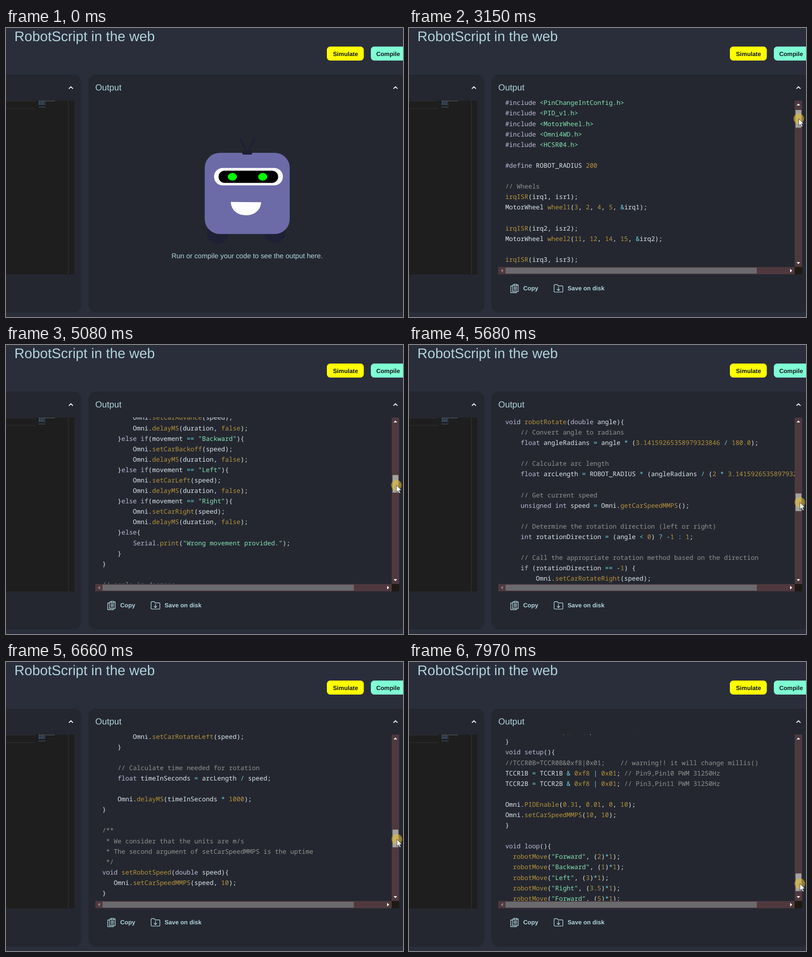
Write an HTML page that moves like this. It is 876 px wide and 639 px high and loops after 8000 ms.

```html
<!DOCTYPE html>
<html lang="en">
<head>
<meta charset="utf-8">
<title>RobotScript in the web</title>
<style>
@property --s { syntax: "<number>"; inherits: true; initial-value: 0; }
html, body { margin: 0; width: 100%; height: 100%; overflow: hidden; background: #2a2e3b; }
#stage { position: relative; width: 876px; height: 639px; overflow: hidden; animation: scroll 8s linear infinite; }
svg { position: absolute; left: 0; top: 0; width: 876px; height: 639px; }
svg text { font-family: "Liberation Sans", Arial, sans-serif; fill: #b0d3dc; text-rendering: geometricPrecision; }
svg .btn { font-weight: bold; font-size: 13.3px; }
svg .dark { fill: #14161c; }
#view { position: absolute; left: 197px; top: 160px; width: 654px; height: 368px; overflow: hidden; }
#code {
  margin: 0; padding: 16.3px 0 0 15.4px;
  font: 14.11px/23.1px "Noto Sans Mono", monospace; color: #dde6ec;
  text-rendering: geometricPrecision; font-variant-ligatures: none;
  transform: translateY(calc(var(--s) * -1px));
}
.com { color: #94928f; } .str { color: #85e3b4; } .kw { color: #bfbbd8; }
.fn, .num { color: #b5923c; } .op { color: #67d3e0; }

.idle { animation: idle 8s step-end infinite; }
.result { animation: result 8s step-end infinite; }
.tools { animation: tools 8s linear infinite; }
#thumb { transform: translateY(calc(var(--s) * 1px / 9.398)); animation: thumb 8s step-end infinite; }
#up { animation: up 8s step-end infinite; }
#compile { transform-origin: 844px 56.5px; animation: press 8s linear infinite; }
#compile rect { animation: tint 8s linear infinite; }
#cursor { animation: move 8s linear infinite; }
#arrow { animation: arrow 8s step-end infinite; }
#hand { animation: hand 8s step-end infinite; }
#halo { animation: halo 8s step-end infinite; }

@keyframes scroll {
  0%, 38.4% { --s: 0; }
  42% { --s: 165; }
  47%, 50.3% { --s: 442; }
  51.25%, 51.6% { --s: 478.9; }
  63.5%, 63.75% { --s: 1042.9; }
  71%, 71.85% { --s: 1426; }
  83.25%, 83.6% { --s: 1824.3; }
  99.62%, 100% { --s: 2735.8; }
}
@keyframes move {
  0%, 2.2% { transform: translate(459px, 632px); }
  7% { transform: translate(606px, 430px); }
  12.3% { transform: translate(782px, 131px); }
  16% { transform: translate(812px, 78px); }
  20.5%, 23% { transform: translate(820px, 67px); }
  27% { transform: translate(846px, 128px); }
  31.1%, 38.4% { transform: translate(860px, 195.5px); }
  42% { transform: translate(860px, 214px); }
  47%, 50.3% { transform: translate(861px, 244px); }
  51.25%, 51.6% { transform: translate(861px, 249px); }
  63.5%, 63.75% { transform: translate(861.5px, 310px); }
  71%, 71.85% { transform: translate(862.5px, 348px); }
  83.25%, 83.6% { transform: translate(862.5px, 392px); }
  99.62%, 100% { transform: translate(862.5px, 490px); }
}
@keyframes idle { 0% { visibility: visible; } 22.25%, 100% { visibility: hidden; } }
@keyframes result { 0% { visibility: hidden; } 22.25%, 100% { visibility: visible; } }
@keyframes tools { 0%, 22.2% { opacity: 0; } 23.1%, 100% { opacity: 1; } }
@keyframes thumb { 0% { fill: #6b6a6e; } 29.5%, 100% { fill: #a3a3a0; } }
@keyframes up { 0% { fill: #a08f92; } 38.6%, 100% { fill: #fff; } }
@keyframes press { 0%, 16.5% { transform: none; } 18.5%, 23.2% { transform: scale(.965); } 25%, 100% { transform: none; } }
@keyframes tint { 0%, 16.5% { fill: #7fffd4; } 18.5%, 23.2% { fill: #66e8d2; } 25%, 100% { fill: #7fffd4; } }
@keyframes arrow { 0% { visibility: hidden; } 2.25% { visibility: visible; } 16.5% { visibility: hidden; } 23.2%, 100% { visibility: visible; } }
@keyframes hand { 0% { visibility: hidden; } 16.5% { visibility: visible; } 23.2%, 100% { visibility: hidden; } }
@keyframes halo { 0% { visibility: hidden; } 21.25% { visibility: visible; } 22.4% { visibility: hidden; } 34.6%, 100% { visibility: visible; } }
</style>
</head>
<body>
<div id="stage">
  <svg viewBox="0 0 876 639">
    <rect width="876" height="639" fill="#2a2e3b"/>
    <text x="18.6" y="29" font-size="30.8">RobotScript in the web</text>
    <rect x="708" y="41" width="81.5" height="31" rx="7.5" fill="#ff0"/>
    <text class="btn dark" x="721.5" y="61.5">Simulate</text>
    <g id="compile">
      <rect x="805" y="41" width="78" height="31" rx="7.5" fill="#7fffd4"/>
      <text class="btn dark" x="816.9" y="61.5">Compile</text>
    </g>
    <g fill="#242730">
      <rect x="-60" y="103" width="226" height="526" rx="16"/>
      <rect x="182" y="103" width="700" height="526" rx="16"/>
    </g>
    <text x="197" y="138.3" font-size="19.25">Output</text>
    <path d="M138.8 134.3l4.4-4.4l4.4 4.4M855 134.3l4.4-4.4l4.4 4.4" fill="none" stroke="#f0f4f6" stroke-width="2"/>

    <rect y="160.5" width="151" height="384.5" fill="#1e1e1e"/>
    <path d="M0 161.5H64M0 178H64M137.5 160.5V545" stroke="#353535" fill="none"/>
    <g fill="none" stroke-width="1.2" stroke-dasharray="3 .7 2 .6">
      <path d="M72 161.3H108" stroke="#62686a"/>
      <path d="M72 163.4H86M72 165.5H87M72 167.4H85M72 169.3H87M72 174.7H87" stroke="#47678a"/>
    </g>

    <g class="idle">
      <g fill="#1f2033">
        <ellipse cx="467" cy="455.5" rx="23.5" ry="22"/>
        <ellipse cx="594" cy="454" rx="23" ry="21"/>
      </g>
      <rect x="438.5" y="276" width="187.5" height="179.5" rx="33" fill="#6c6ba8"/>
      <path d="M530.5 273L517.5 245.5M534 273L549 244" stroke="#1f2033" stroke-width="4" stroke-linecap="round"/>
      <rect x="521" y="271" width="22.5" height="9" rx="4" fill="#1f2033"/>
      <rect x="459" y="309.5" width="152" height="38.5" rx="19.2" fill="#fff"/>
      <rect x="469" y="315.5" width="131.5" height="27" rx="13.5"/>
      <g fill="#0f0">
        <ellipse cx="499.5" cy="329" rx="10" ry="8.5"/>
        <ellipse cx="566.5" cy="329" rx="10" ry="8.5"/>
      </g>
      <path d="M496 384.5L563 385.2C562 403 548 414 529.5 414S496.5 403 496 384.5Z" fill="#fff"/>
      <text x="532" y="509.3" font-size="15.4" text-anchor="middle">Run or compile your code to see the output here.</text>
    </g>
  </svg>

  <div id="view" class="result"><pre id="code"></pre></div>

  <svg viewBox="0 0 876 639">
    <g class="result">
      <path d="M851 160.5h16.5V528.5h-16.5zM197 528.5H851v16H197z" fill="#4f393f"/>
      <rect x="851" y="528.5" width="16.5" height="16" fill="#1e1913"/>
      <rect x="213" y="530" width="554.5" height="13" fill="#6b6a6e"/>
      <rect id="thumb" x="853" y="176.5" width="12.8" height="39"/>
      <path id="up" d="M855.2 171.3h8l-4-4.2z"/>
      <path d="M855.2 517.7h8l-4 4.2zM841 532.5v8l4.4-4z" fill="#fff"/>
      <path d="M207.2 532.5v8l-4.2-4z" fill="#9a8589"/>
    </g>
    <g class="tools">
      <g fill="none" stroke="#b0d3dc" stroke-width="1.4">
        <path d="M228.5 570.5h-4v14.8h12.5v-2.5M228.5 568.3h3.2M238 568.3h3v14.2h-12.5v-14.2M231.7 570v-3.2h6.3v3.2zM231 573.5h7.5M231 576.3h7.5M231 579.1h7.5"/>
        <path d="M320.2 582.2v-13a1.7 1.7 0 0 1 1.7-1.7h5.3l2.3 2.8h8.3a1.7 1.7 0 0 1 1.7 1.7v10.2a1.7 1.7 0 0 1-1.7 1.7h-15.900a1.7 1.7 0 0 1-1.7-1.7zM329.8 572.5v8M326.5 577.5l3.3 3.2l3.3-3.2"/>
      </g>
      <text class="btn" x="252" y="580.3">Copy</text>
      <text class="btn" x="350" y="580.3">Save on disk</text>
    </g>
    <g id="cursor">
      <circle id="halo" r="11.5" fill="#e1be32" fill-opacity=".58"/>
      <path id="arrow" d="M0 0V15.5L3.6 12.2L6.2 18L8.8 16.9L6.3 11.2H11Z" fill="#fff" stroke="#111" stroke-width=".8"/>
      <path id="hand" d="M-1.7 1.2C-1.7-1 1.7-1 1.7 1.2V7C3 6 5.2 6.6 5.2 8C6.2 6.6 8 7.2 8 9C9.2 8 10.5 8.7 10.5 10.5V15C10.5 18 8.5 18.5 8.3 21.8H-1.5C-1.7 18.5-4.5 16.5-6.2 13C-7.5 10.5-5 9.5-3.5 11.5L-1.7 13.5Z" fill="#fff" stroke="#111" stroke-width=".9"/>
    </g>
  </svg>
</div>
<script>
const source = `#include <PinChangeInt.h>
#include <PinChangeIntConfig.h>
#include <PID_v1.h>
#include <MotorWheel.h>
#include <Omni4WD.h>
#include <HCSR04.h>

#define ROBOT_RADIUS 200

// Wheels
irqISR(irq1, isr1);
MotorWheel wheel1(3, 2, 4, 5, &irq1);

irqISR(irq2, isr2);
MotorWheel wheel2(11, 12, 14, 15, &irq2);

irqISR(irq3, isr3);
MotorWheel wheel3(9, 8, 16, 17, &irq3);


irqISR(irq4, isr4);
MotorWheel wheel4(10, 7, 18, 19, &irq4);

Omni4WD Omni(&wheel1, &wheel2, &wheel3, &wheel4);
// Init the omni speed to 0.01 m/s (1st args in mm, 2nd to be invisible)

HCSR04 hc (2, new int[4]{1, 6, 13, 20}, 4);


/**
 * We consider that the units are m, s and m/s
*/
void robotMove(String movement, double distance){
    // Convert distance in mm
    distance *= 1000;

    // Get current speed
    unsigned int speed = Omni.getCarSpeedMMPS();

    // Calculate the duration in ms
    unsigned int duration = (distance / speed) * 1000;

    // Move the robot
    if(movement == "Forward"){
        Omni.setCarAdvance(speed);
        Omni.delayMS(duration, false);
    }else if(movement == "Backward"){
        Omni.setCarBackoff(speed);
        Omni.delayMS(duration, false);
    }else if(movement == "Left"){
        Omni.setCarLeft(speed);
        Omni.delayMS(duration, false);
    }else if(movement == "Right"){
        Omni.setCarRight(speed);
        Omni.delayMS(duration, false);
    }else{
        Serial.print("Wrong movement provided.");
    }
}

// angle in degrees
void robotRotate(double angle){
    // Convert angle to radians
    float angleRadians = angle * (3.14159265358979323846 / 180.0);

    // Calculate arc length
    float arcLength = ROBOT_RADIUS * (angleRadians / (2 * 3.14159265358979323846));

    // Get current speed
    unsigned int speed = Omni.getCarSpeedMMPS();

    // Determine the rotation direction (left or right)
    int rotationDirection = (angle < 0) ? -1 : 1;

    // Call the appropriate rotation method based on the direction
    if (rotationDirection == -1) {
        Omni.setCarRotateRight(speed);
    } else {
        Omni.setCarRotateLeft(speed);
    }

    // Calculate time needed for rotation
    float timeInSeconds = arcLength / speed;

    Omni.delayMS(timeInSeconds * 1000);
}

/**
 * We consider that the units are m/s
 * The second argument of setCarSpeedMMPS is the uptime
 */
void setRobotSpeed(double speed){
   Omni.setCarSpeedMMPS(speed, 10);
}

/**
 * Return the distance to the closest obstacle
 */
double getDistance(){
    double closest = hc.dist(0);
    for(int i = 1; i < 4; i++){
        double current = hc.dist(i);
        if(current < closest){
            closest = current;
        }
    }
    return closest / 100;
}

/**
 * Return the current time in ms
 */
unsigned int getTime(){
    return millis();
}

void stopRobot(int speed){
    Omni.setStop_PID(speed, 10, 0);
}
void setup(){
//TCCR0B=TCCR0B&0xf8|0x01;    // warning!! it will change millis()
TCCR1B = TCCR1B & 0xf8 | 0x01; // Pin9,Pin10 PWM 31250Hz
TCCR2B = TCCR2B & 0xf8 | 0x01; // Pin3,Pin11 PWM 31250Hz

Omni.PIDEnable(0.31, 0.01, 0, 10);
Omni.setCarSpeedMMPS(10, 10);
}

void loop(){
  robotMove("Forward", (2)*1);
  robotMove("Backward", (1)*1);
  robotMove("Left", (3)*1);
  robotMove("Right", (3.5)*1);
  robotMove("Forward", (5)*1);
}`;

const words = "void|double|float|int|unsigned|new|if|else|for|return|String|Serial|setup|loop";
const token = new RegExp([
  "(?<com>//.*|/\\*.*|^ ?\\*.*)",
  "(?<str>\"[^\"]*\"|<\\w+\\.h>)",
  `(?<kw>#\\w+|\\b(?:${words})\\b)`,
  "(?<fn>\\b[A-Za-z]\\w*(?= ?\\())",
  "(?<num>\\b(?:0x[\\da-f]+|\\d+(?:\\.\\d+)?|false)\\b)",
  "(?<op>[-+*/=&|<>?:]+)",
  "\\w+"
].join("|"), "gm");

const escapeHtml = s => s.replace(/&/g, "&amp;").replace(/</g, "&lt;");

function highlight(text) {
  let html = "", last = 0;
  for (const m of text.matchAll(token)) {
    const kind = Object.keys(m.groups).find(k => m.groups[k]);
    const body = escapeHtml(m[0]);
    html += escapeHtml(text.slice(last, m.index));
    html += kind ? `<span class="${kind}">${body}</span>` : body;
    last = m.index + m[0].length;
  }
  return html + escapeHtml(text.slice(last));
}

document.getElementById("code").innerHTML = highlight(source);
</script>
</body>
</html>
```
